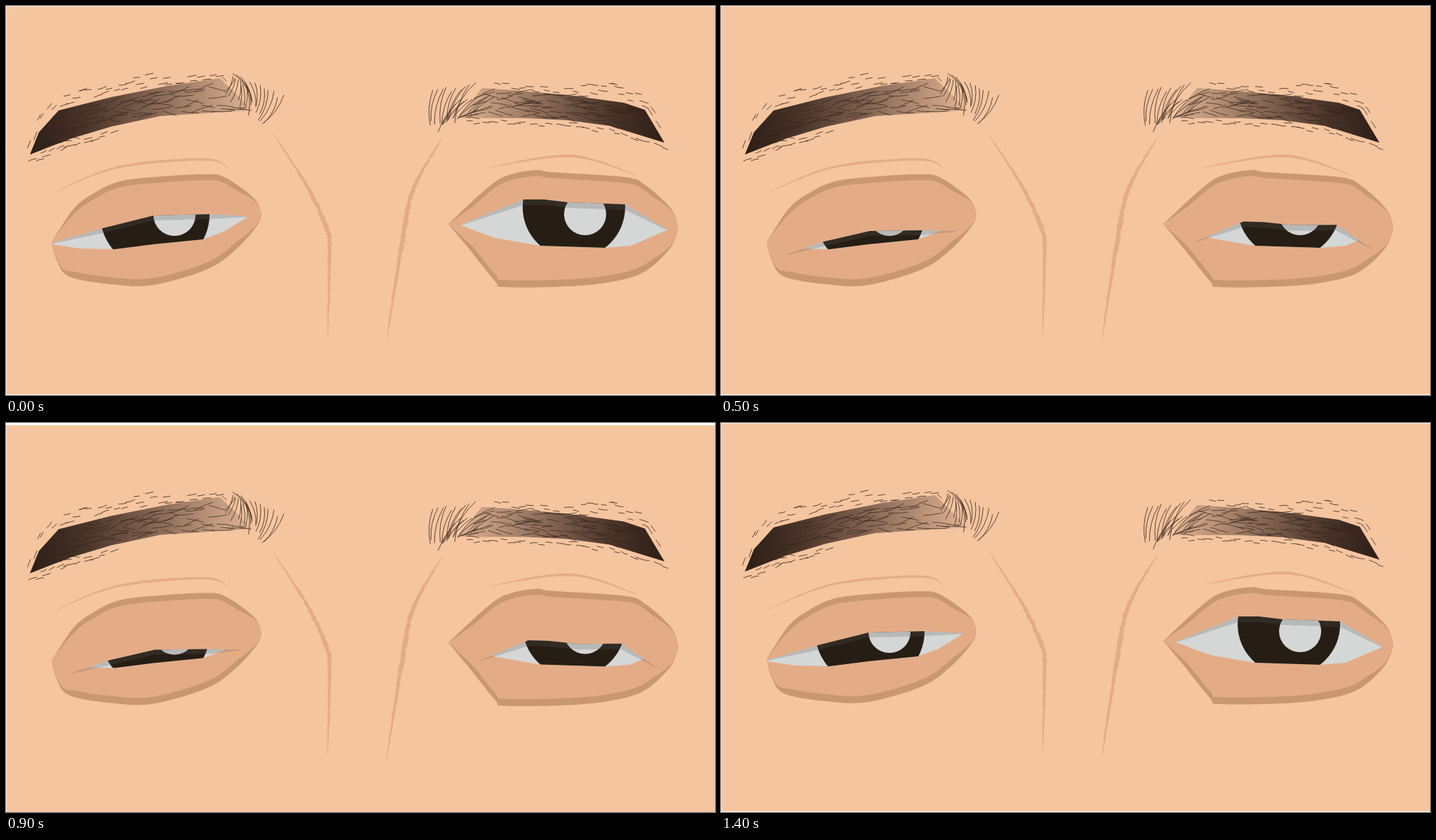
Recreate the animation shown at these times as an HTML page with a canvas. Size 1010 px wide and 555 px high, loop 1500 ms.

```html
<!DOCTYPE html>
<html lang="en">
<head>
<meta charset="utf-8">
<title>Sleepy eyes</title>
<style>
html, body { margin: 0; width: 100%; height: 100%; overflow: hidden; background: #fff; }
canvas { display: block; }
</style>
</head>
<body>
<canvas id="c" width="1010" height="555"></canvas>
<script>
const ctx = document.getElementById('c').getContext('2d');
const FACE = '#f5c59f', LID = '#e4ac86', RIM = '#c99771', HAIR = '#33241c';
const WHITE = '#d4d7d6', IRIS = '#261e14', SHADE = 'rgba(89,87,90,.235)';
const STEP = 100, STEPS = 15, SHUT = 7;

let seed = 1;
const rnd = () => (seed = (seed * 16807) % 2147483647) / 2147483647;
const span = (a, b) => a + (b - a) * rnd();
const mix = (a, b, k) => a + (b - a) * k;
const mixPt = (a, b, k) => [mix(a[0], b[0], k), mix(a[1], b[1], k)];
const pts = s => s.split(' ').map(p => p.split(',').map(Number));

// smooth line through a few points (Catmull-Rom)
function spline(p, n = 10) {
  const out = [], at = i => p[Math.max(0, Math.min(p.length - 1, i))];
  const cubic = (a, b, c, d, t) =>
    b + t / 2 * (c - a + t * (2 * a - 5 * b + 4 * c - d + t * (3 * (b - c) + d - a)));
  for (let i = 0; i < p.length - 1; i++) {
    const q = [-1, 0, 1, 2].map(k => at(i + k));
    for (let j = 0; j < n; j++) {
      out.push([0, 1].map(k => cubic(...q.map(v => v[k]), j / n)));
    }
  }
  return [...out, at(p.length)];
}

// height of a line at x
function edge(p, x) {
  let i = 1;
  while (i < p.length - 1 && p[i][0] < x) i++;
  const [a, b] = [p[i - 1], p[i]];
  return mix(a[1], b[1], (x - a[0]) / (b[0] - a[0] || 1));
}

function trace(p) {
  ctx.beginPath();
  p.forEach(([x, y]) => ctx.lineTo(x, y));
  ctx.closePath();
}
function fill(p, color) {
  trace(p);
  ctx.fillStyle = color;
  ctx.fill();
}
function between(a, b, color) {
  fill([...a, ...[...b].reverse()], color);
}
function disc(x, y, r, color) {
  ctx.beginPath();
  ctx.arc(x, y, r, 0, 7);
  ctx.fillStyle = color;
  ctx.fill();
}

// tapered skin crease with a ragged edge; flat creases widen vertically
function crease({ path, width, rough, flat }) {
  const line = spline(pts(path), 22), n = line.length - 1;
  const side = s => line.map(([x, y], i) => {
    const w = s * (width + span(-rough, rough)) / 2 * Math.sin(Math.PI * i / n) ** .8;
    return flat ? [x, y + w] : [x + w, y];
  });
  between(side(-1), side(1), LID);
}

const creases = [
  { path: '379,180 427,254 456,315 461,352 458,472', width: 6.5, rough: 2.4 },
  { path: '623,186 580,262 563,346 542,480', width: 6.5, rough: 2.2 },
  { path: '65,267 160,230 285,219 320,234', width: 3.5, rough: .5, flat: true },
  { path: '684,231 805,214 902,243', width: 3.5, rough: .5, flat: true }
];

const brows = [{
  top: pts('34,212 47,180 75,149 150,130 230,114 305,103 352,149'),
  low: pts('34,212 90,190 150,172 220,157 300,152 352,149'),
  tail: 34, head: 352
}, {
  top: pts('643,160 678,117 720,120 800,127 880,138 910,148 938,195'),
  low: pts('643,160 740,160 800,163 860,171 938,195'),
  tail: 938, head: 643
}];

function hair(x0, y0, x1, y1, bend = 0) {
  ctx.beginPath();
  ctx.moveTo(x0, y0);
  ctx.quadraticCurveTo((x0 + x1) / 2 - (y1 - y0) * bend, (y0 + y1) / 2 + (x1 - x0) * bend, x1, y1);
  ctx.stroke();
}

// loose hairs lying beside a brow edge
function fringe(line, from, to, n, near, far) {
  for (let i = 0; i < n; i++) {
    const x = mix(from, to, (i + rnd()) / n), y = edge(line, x) + span(near, far);
    const rise = (edge(line, x + 6) - edge(line, x - 6)) / 12;
    const dx = span(7, 13) / Math.hypot(1, rise);
    hair(x, y, x + dx, y + dx * rise + span(-1.5, 1.5), span(-.12, .12));
  }
}

// a sweep of hairs whose roots and tips each follow a line
function fan(n, root, tip, bend) {
  for (let i = 0; i < n; i++) {
    const k = i / (n - 1), a = mixPt(...root, k), b = mixPt(...tip, k);
    hair(a[0] + span(-4, 4), a[1] + span(-5, 5), b[0] + span(-2, 2), b[1] + span(-4, 4), bend);
  }
}

function drawBrow({ top, low, tail, head }) {
  const g = ctx.createLinearGradient(tail, 0, head, 0);
  ['#2c1e17', '#493429', '#7a5c4b', '#ae8970', '#e2b494'].forEach((c, i) => g.addColorStop(i / 4, c));
  between(top, low, g);
  ctx.lineWidth = .7;
  for (let i = 0; i < 85; i++) {
    const x = mix(tail, head, span(.12, .97)), half = span(8, 15), v = span(.03, .97);
    const y = (dx, k) => mix(edge(top, x + dx), edge(low, x + dx), k);
    const y0 = y(-half, v), y1 = y(half, v + span(-.2, .2));
    if (Math.abs(y1 - y0) < half) hair(x - half, y0, x + half, y1, span(-.1, .1));
  }
}

function drawBrows() {
  const [l, r] = brows;
  ctx.strokeStyle = HAIR;
  ctx.lineCap = 'round';
  brows.forEach(drawBrow);
  ctx.lineWidth = .8;
  fringe(l.top, 28, 225, 28, -22, -4);
  fringe(l.top, 225, 310, 10, -9, -1);
  fringe(l.low, 28, 150, 16, 3, 15);
  fringe(r.top, 690, 820, 12, -9, 0);
  fringe(r.top, 815, 930, 18, -26, -4);
  fringe(r.low, 655, 936, 26, 1, 10);
  fan(12, [[345, 125], [366, 172]], [[322, 97], [394, 131]], .16);
  fan(9, [[345, 152], [310, 122]], [[345, 118], [322, 98]], .12);
  fan(10, [[605, 168], [640, 163]], [[608, 124], [668, 112]], -.14);
  fan(10, [[612, 176], [665, 150]], [[640, 138], [695, 128]], -.1);
}

const eyes = [{
  top: '65,337 95,291 122,269 163,250 225,243 285,240 313,245 354,275 364,298',
  base: '65,337 72,362 90,386 150,397 210,398 288,375 330,345 358,313 364,298',
  lids: [
    [0, pts('66,338 138,317 210,299 290,297 344,300')],
    [5, pts('94,354 147,336 212,321 286,320 334,321')],
    [SHUT, pts('105,364 174,346 208,338 245,338 340,337')]
  ],
  low: pts('66,340 105,346 155,347 210,340 280,333 310,322 344,301'),
  slit: [174, 245], pace: 1.4, shade: 7,
  iris: [212, 297, 78], glint: [240, 298, 30]
}, {
  top: '630,311 690,256 720,240 757,234 777,237 880,244 910,255 948,290 958,318',
  base: '630,311 660,347 697,393 710,401 800,400 860,394 908,380 945,347 958,318',
  lids: [
    [0, pts('648,312 737,276 766,276 800,280 882,283 942,319')],
    [SHUT, pts('686,346 747,320 775,321 822,326 874,324 921,357')]
  ],
  low: pts('648,313 697,331 760,342 855,345 890,342 943,319'),
  slit: [745, 884], pace: 1, shade: 8,
  iris: [809, 287, 73], glint: [825, 297, 30]
}];

function lidAt({ lids, pace }, level) {
  const i = Math.max(1, lids.findIndex(([l]) => l >= level));
  const [[a, p], [b, q]] = [lids[i - 1], lids[i]];
  const k = 1 - (1 - (level - a) / (b - a)) ** pace;
  return p.map((v, j) => mixPt(v, q[j], k));
}

// the lower lid rises to meet the upper one, leaving a narrow slit
function lowAt({ low, slit: [a, b] }, lid, level) {
  const k = Math.max(0, (level - 5) / 2);
  if (!k) return low;
  const x0 = low[0][0], x1 = low[low.length - 1][0], n = 60;
  return Array.from({ length: n + 1 }, (_, i) => {
    const x = mix(x0, x1, i / n), u = (x - a) / (b - a);
    const gap = u > 0 && u < 1 ? 6 * Math.sin(Math.PI * u) ** .5 : -1;
    return [x, mix(edge(low, x), edge(lid, x) + gap, k)];
  });
}

// the lid skin is the rim pulled in vertically, least at the corners
function inset(line, d) {
  const x0 = line[0][0], w = line[line.length - 1][0] - x0;
  return line.map(([x, y]) => {
    const u = Math.max(0, Math.min(1, (x - x0) / w));
    return [x, y + d * Math.min(1, 9 * Math.min(u, 1 - u))];
  });
}

function clipBand(line, y) {
  trace([...line, [line[line.length - 1][0], y], [line[0][0], y]]);
  ctx.clip();
}

function drawEye(e, level) {
  const top = spline(pts(e.top)), base = spline(pts(e.base));
  const lid = lidAt(e, level), low = lowAt(e, lid, level);
  between(top, base, RIM);
  between(inset(top, 8.5), inset(base, -10), LID);

  ctx.save();
  clipBand(lid, 600);
  clipBand(low, 0);
  ctx.fillStyle = WHITE;
  ctx.fillRect(0, 0, 1010, 555);
  disc(...e.iris, IRIS);
  disc(...e.glint, WHITE);
  ctx.restore();

  const last = lid.length - 1;
  between(lid, lid.map(([x, y], i) => [x, y + (i % last ? e.shade : 1)]), SHADE);
}

// the whole face dips slightly just after the eyes close
const dip = i => 2.5 * Math.max(0, Math.min((i - 7) / 2, (12 - i) / 3));

function draw(i) {
  seed = 4217;
  ctx.fillStyle = '#fff';
  ctx.fillRect(0, 0, 1010, 555);
  ctx.save();
  ctx.translate(0, dip(i));
  ctx.fillStyle = FACE;
  ctx.fillRect(.6, .7, 1010, 553.3);
  creases.forEach(crease);
  drawBrows();
  eyes.forEach(e => drawEye(e, SHUT - Math.abs(SHUT - i)));
  ctx.restore();
}

let shown = -1;
const start = performance.now();
function tick() {
  const i = Math.floor((performance.now() - start) / STEP) % STEPS;
  if (i !== shown) draw(shown = i);
  requestAnimationFrame(tick);
}
tick();
</script>
</body>
</html>
```
